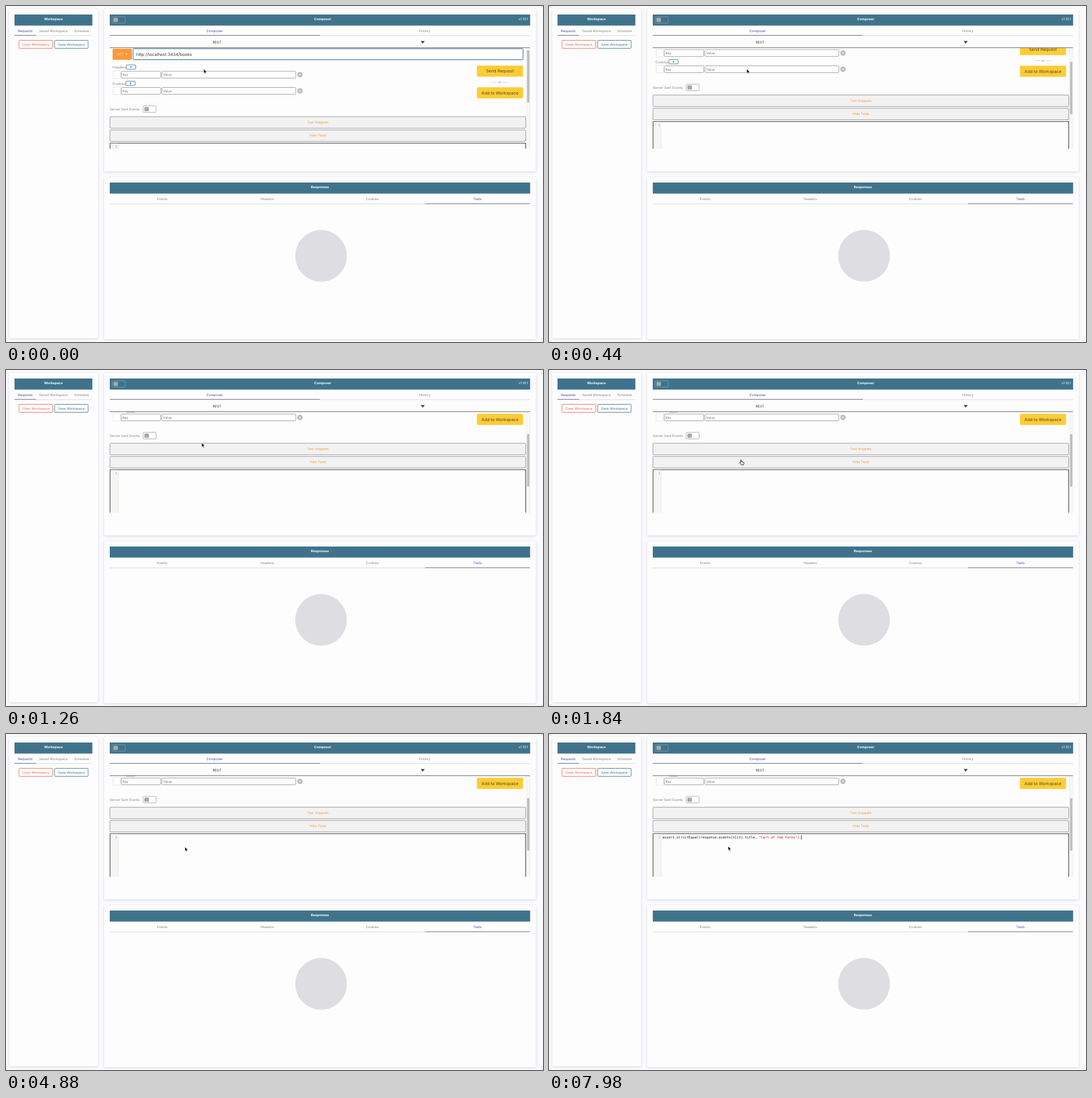
An HTML page that plays this animation: 947 by 592 pixels, repeating every 8 s.

```html
<!DOCTYPE html>
<html lang="en">
<head>
<meta charset="utf-8">
<title>Composer</title>
<style>
  html, body { margin: 0; width: 100%; height: 100%; overflow: hidden; background: #fbfbfd; }
  svg { display: block; width: 947px; height: 592px; }
  text { font-family: Inter, sans-serif; text-rendering: geometricPrecision; white-space: pre; }
  .mono { font-family: "DejaVu Sans Mono", monospace; }
  .panel { filter: drop-shadow(0 1px 2px rgba(60, 60, 110, .2)); }
</style>
</head>
<body>
<svg id="stage" viewBox="0 0 947 592"></svg>
<script>
const LOOP = 8000;
const TEAL = '#40738b', GREY = '#858585', ACTIVE = '#4548b0', ORANGE = '#f39a3c';
const stage = document.getElementById('stage');

const rect = (x, y, w, h, fill, stroke = 'none', r = 0, sw = 1) =>
  `<rect x="${x}" y="${y}" width="${w}" height="${h}" rx="${r}" fill="${fill}" stroke="${stroke}" stroke-width="${sw}"/>`;
const path = (d, stroke, sw = 1, fill = 'none') =>
  `<path d="${d}" fill="${fill}" stroke="${stroke}" stroke-width="${sw}"/>`;
// y is the middle of the capitals
const text = (s, x, y, fill, { size = 5.9, anchor = 'middle', weight = 400, cls = '' } = {}) =>
  `<text x="${x}" y="${y + size * .36}" fill="${fill}" font-size="${size}" text-anchor="${anchor}" font-weight="${weight}" class="${cls}">${s}</text>`;
const left = { anchor: 'start' };

const panel = (x, y, w, h) => `<g class="panel">${rect(x, y, w, h, '#fdfdfd', 'none', 3)}</g>`;
const header = (title, x, y, w, cx) =>
  rect(x, y, w, 19.5, TEAL) + text(title, cx, y + 8.3, '#fff', { weight: 700 });
const toggle = (x, y, fill, stroke) =>
  rect(x, y, 23, 11.5, fill, stroke, 1.5, .8) + rect(x + 2.2, y + 2, 8, 7.5, '#a9a9a9', 'none', 1.5);
const tabs = (items, active, y) =>
  items.map(([label, cx], i) => text(label, cx, y, i === active ? ACTIVE : GREY)).join('');
const underline = (x1, x2, y, a, b) =>
  path(`M${x1} ${y + .5}H${x2}`, '#d8d8dc') + path(`M${a} ${y}H${b}`, '#74748f');
const outlineButton = (label, x, w, color) =>
  rect(x, 60.5, w, 14, '#fff', color, 1, .9) + text(label, x + w / 2, 67.5, color);
const plusButton = (x, y) =>
  rect(x, y, 16.5, 7.5, '#fff', TEAL, 1, .9) +
  path(`M${x + 6.2} ${y + 3.8}h4m-2 -2v4`, TEAL, .8);
const field = (label, x, y, w) =>
  rect(x, y, w, 12, '#fff', '#8a8a8a', 1.5, .8) + text(label, x + 2, y + 6, '#777', left);
const pairRow = y =>
  rect(189, y - 6.5, 12.5, 13, '#fff', '#dedede', 0, .8) +
  field('Key', 203.3, y - 6, 69.5) + field('Value', 275, y - 6, 236) +
  `<circle cx="518.4" cy="${y}" r="4.8" fill="#bdbdbd"/>` +
  path(`M516.7 ${y - 1.7}l3.4 3.4m0 -3.4l-3.4 3.4`, '#fff', .9);
const yellowButton = (label, y) =>
  rect(830.5, y, 81.3, 19.5, '#ffcc36', 'none', 1.5) + text(label, 871, y + 9.7, '#4a4632', { size: 7.45 });
const wideButton = (label, y) =>
  rect(183.3, y, 733.2, 20.3, '#f2f2f3', '#8d8d92', 1.5, .9) + text(label, 550, y + 10, ORANGE);

const sidebar =
  panel(5.5, 5, 157, 580.5) + header('Workspace', 15, 15, 137.3, 83.7) +
  tabs([['Requests', 34], ['Saved Workspace', 83.5], ['Schedule', 133.2]], 0, 44.2) +
  underline(15, 152.3, 51.7, 15, 53) +
  outlineButton('Clear Workspace', 23, 59.5, '#e06a58') +
  outlineButton('Save Workspace', 85.8, 59, TEAL);

const composerTop =
  panel(173, 5, 761.5, 286.5) + header('Composer', 183, 15, 741.3, 558.5) +
  toggle(187.2, 18.8, 'none', '#86a5b3') +
  text('v1.10.1', 920.5, 23.3, '#fff', { anchor: 'end' }) +
  tabs([['Composer', 368], ['History', 738.7]], 0, 44.2) +
  underline(183, 924, 51.7, 183, 553.5) +
  text('REST', 372, 64, '#333') +
  path('M731.2 61.8h7.4l-3.7 4.5z', 'none', 0, '#444') +
  path('M183 73.5H924', '#6a6a6a');

const form =
  rect(188, 75.2, 34, 19.5, '#fb9938', 'none', 1.5) +
  text('GET', 201.5, 84.8, '#fde3c6') +
  path('M211 83.8h3.6l-1.8 2.2z', 'none', 0, '#fde3c6') +
  rect(223.3, 74.4, 689.3, 21, 'none', '#d5e3ea', 2, 1) +
  rect(224.2, 75.3, 687.5, 19.2, '#fff', TEAL, 1.5, 1) +
  text('http://localhost:3434/books', 229.8, 85, '#383838', { size: 7.45, anchor: 'start' }) +
  text('Headers', 188, 108, GREY, left) + plusButton(212.2, 103.9) + pairRow(121) +
  text('Cookies', 188, 136.5, GREY, left) + plusButton(211.3, 132.5) + pairRow(149.5) +
  yellowButton('Send Request', 105) + text('---- or ----', 871, 133.7, GREY) +
  yellowButton('Add to Workspace', 143.3) +
  text('Server Sent Events', 183, 182.2, GREY, left) + toggle(241.8, 175.9, '#fff', '#9a9a9a') +
  wideButton('Test Snippets', 195) + wideButton('Hide Tests', 218.3) +
  rect(183.5, 241.7, 733, 140, '#fdfdfd', '#333', 0, 1) +
  rect(184, 242.2, 14, 139, '#f5f5f3') + path('M198 242.2v139', '#ddd', .6) +
  text('1', 194.3, 248, '#999', { cls: 'mono' }) +
  text('', 200, 248, '#111', { anchor: 'start', cls: 'mono' }).replace('<text', '<text id="code"') +
  '<rect id="caret" y="243.9" width=".8" height="8" fill="#222"/>';

const responses =
  panel(173, 301.5, 761.5, 285.5) + header('Responses', 183, 311, 741.3, 553.5) +
  tabs([['Events', 275.5], ['Headers', 460.7], ['Cookies', 646], ['Tests', 831.5]], 3, 340.3) +
  underline(183, 924, 348.3, 739, 924) +
  '<circle cx="555.6" cy="440.3" r="45.5" fill="#dedee2"/>';

const pointers =
  `<g id="arrow">${path('M0 0V7.4L1.7 5.9L2.9 8.6L4.1 8.1L3 5.4H5.3Z', '#fff', .6, '#000')}</g>` +
  `<g id="hand">${path('M-.8 .6Q0 -.4 .7 .6V3.3L4.6 4.2Q5.5 4.5 5.2 5.7L4.4 8.9H.3L-2.4 5.6Q-2.4 4.4 -.8 5.3Z', '#111', .9, '#fff')}</g>`;

stage.innerHTML =
  `<clipPath id="view"><rect x="182" y="74" width="743" height="177.5"/></clipPath>` +
  sidebar + composerTop +
  `<g clip-path="url(#view)"><g id="form">${form}</g>` +
  rect(917.6, 74, 6.4, 178, '#f7f7f7') + path('M917.8 74v178M924 74v178', '#e6e6e6', .6) +
  `<g id="thumb">${rect(918.8, 77.5, 4.2, 93, '#bfbfbf', 'none', 2)}</g></g>` +
  responses + pointers;

const el = Object.fromEntries(['form', 'thumb', 'code', 'caret', 'arrow', 'hand']
  .map(id => [id, document.getElementById(id)]));

// keys: [time, value] pairs, linear in between
function track(keys, t) {
  const i = keys.findIndex(k => k[0] > t);
  if (i === 0) return keys[0][1];
  if (i < 0) return keys[keys.length - 1][1];
  const [t0, a] = keys[i - 1], [t1, b] = keys[i];
  return a + (b - a) * (t - t0) / (t1 - t0);
}
const SCROLL = [[20, 0], [100, 4], [440, 38], [720, 62.5], [800, 65], [920, 66]];
const POINTER_X = [[1000, 348.8], [1700, 339], [1900, 338.5], [2400, 315.6], [7500, 315.6], [7900, 316]];
const POINTER_Y = [[1000, 111], [1700, 157.5], [1900, 158.5], [2400, 199], [7500, 199], [7900, 197.8]];
const TYPED = [[5850, 0], [6650, 19], [7920, 69]];

const CODE = 'assert.strictEqual(response.events[0][0].title, "Cart of the Ferns");';
const CHAR_WIDTH = 5.9 * .602;
const FOCUS_AT = 3250, BLINK = 530;

const highlight = s => s.replace(/"[^"]*"?|\d/g, m =>
  `<tspan fill="${m[0] === '"' ? '#a11' : '#164'}">${m}</tspan>`);

function draw(t) {
  const scroll = track(SCROLL, t);
  el.form.setAttribute('transform', `translate(0 ${-scroll})`);
  el.thumb.setAttribute('transform', `translate(0 ${scroll * .535})`);

  const x = track(POINTER_X, t), y = track(POINTER_Y, t);
  const overButton = y > 129 && y < 172.5;
  for (const p of [el.arrow, el.hand]) p.setAttribute('transform', `translate(${x} ${y})`);
  el.arrow.style.display = overButton ? 'none' : '';
  el.hand.style.display = overButton ? '' : 'none';

  const count = Math.floor(track(TYPED, t));
  el.code.innerHTML = highlight(CODE.slice(0, count));
  el.caret.setAttribute('x', 200 + count * CHAR_WIDTH);
  const caretOn = t >= FOCUS_AT && (count > 0 || (t - FOCUS_AT) % (2 * BLINK) < BLINK);
  el.caret.style.display = caretOn ? '' : 'none';
}

function frame() {
  draw(performance.now() % LOOP);
  requestAnimationFrame(frame);
}
frame();
</script>
</body>
</html>
```
